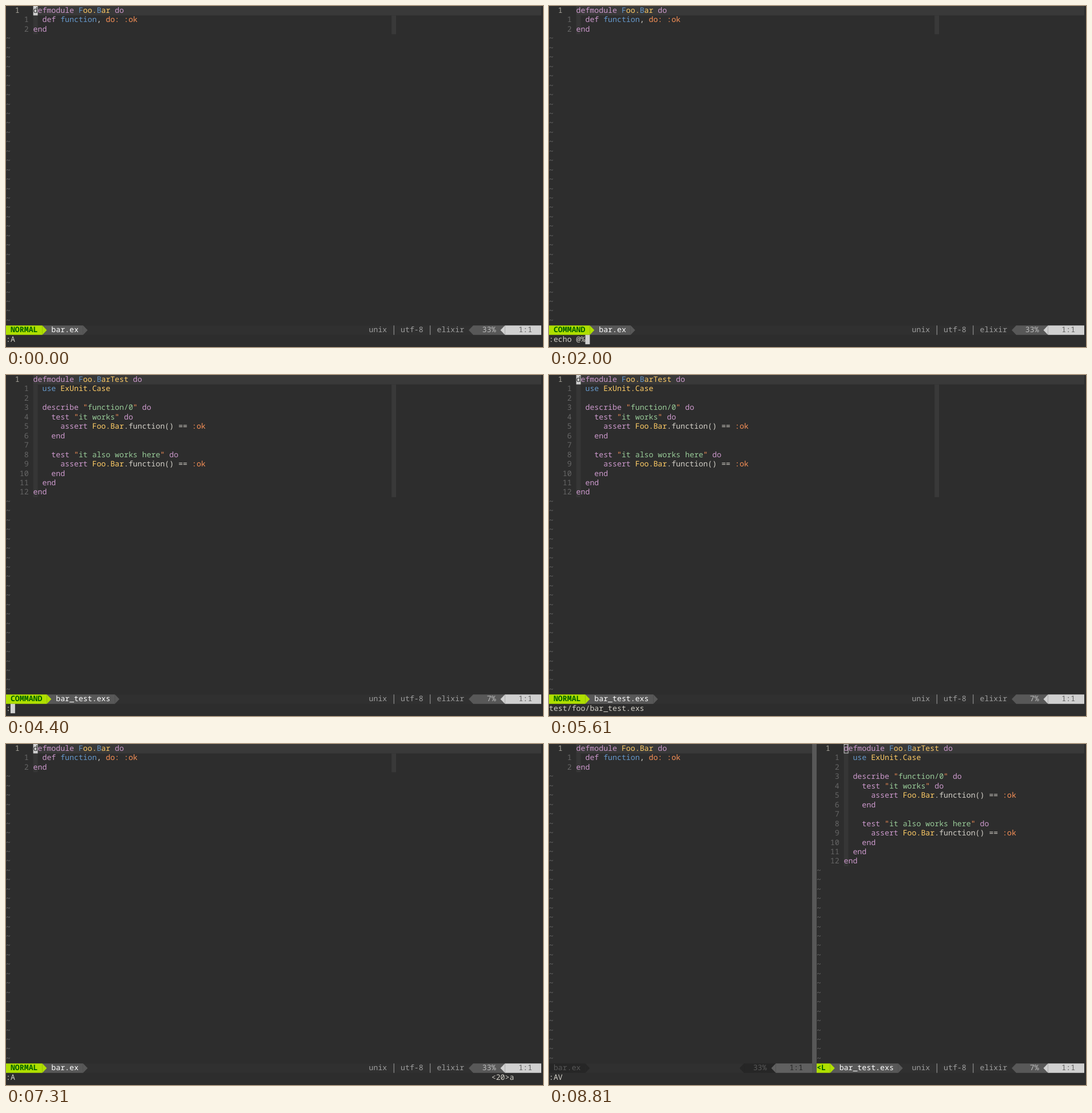
These frames come from a looping animation (939x597 px, 8840 ms). An HTML page:

```html
<!DOCTYPE html>
<html lang="en">
<head>
<meta charset="utf-8">
<title>Switching between module and test</title>
<style>
  html, body { margin: 0; width: 100%; height: 100%; overflow: hidden; background: #2d2d2d; }
  svg { display: block; width: 939px; height: 597px; }
  text {
    font: 13.22px "Noto Sans Mono", "DejaVu Sans Mono", monospace;
    text-rendering: geometricPrecision;
    white-space: pre;
  }
  .bold { font-weight: 700; }
</style>
</head>
<body>
<svg id="screen" viewBox="0 0 939 597"></svg>
<script>
const CW = 7.932, RH = 16.45, BASE = 12;
const COLS = 118, STATUS = 34, CMD = 35, GUTTER = 6, RULER = 85;
const LOOP = 8840;

const INK = { p: '#cc99cc', b: '#6699cc', y: '#ffcc66', o: '#f99157', g: '#99cc99', w: '#d3d0c8' };
const BG = '#2d2d2d', LINE = '#393939', CURSOR = '#d0d0d0', DIM = '#666666', GRAY = '#585858';

const MODULE = [
  '{p}defmodule {b}F{y}oo.{b}B{y}ar {p}do',
  '  {p}def {b}function{w}, {o}do: :ok',
  '{p}end'
];
const PLAIN_MODULE = ['{p}defmodule {y}Foo.Bar {p}do', ...MODULE.slice(1)];

const testCase = name => [
  `    {p}test {o}"{g}${name}{o}" {p}do`,
  '      {p}assert {y}Foo.Bar{w}.function() == {o}:ok',
  '    {p}end'
];
const TEST = [
  '{p}defmodule {b}F{y}oo.{b}B{y}arTest {p}do',
  '  {b}use {y}ExUnit.Case',
  '',
  '  {p}describe {o}"{g}function/0{o}" {p}do',
  ...testCase('it works'),
  '',
  ...testCase('it also works here'),
  '  {p}end',
  '{p}end'
];

const FILES = {
  module: { name: 'bar.ex', lines: MODULE, percent: '33%' },
  test: { name: 'bar_test.exs', lines: TEST, percent: ' 7%' }
};

// [start, view, command line, command mode, pending keys]
const STEPS = [
  [0, 'module', ':A'],
  [600, 'module', ':', true],
  [1030, 'module', ':e', true],
  [1130, 'module', ':ec', true],
  [1240, 'module', ':ech', true],
  [1330, 'module', ':echo', true],
  [1470, 'module', ':echo ', true],
  [1640, 'module', ':echo @', true],
  [1740, 'module', ':echo @%', true],
  [2270, 'module', 'lib/foo/bar.ex'],
  [3170, 'module', 'lib/foo/bar.ex', false, '<20>'],
  [3270, 'module', 'lib/foo/bar.ex', false, '<20>a'],
  [3400, 'test', ':A'],
  [4140, 'test', ':', true],
  [4510, 'test', ':echo @%', true],
  [5010, 'test', 'test/foo/bar_test.exs'],
  [5810, 'test', 'test/foo/bar_test.exs', false, '<20>'],
  [5870, 'test', 'test/foo/bar_test.exs', false, '<20>a'],
  [6110, 'module', ':A'],
  [7010, 'module', ':A', false, '<20>'],
  [7040, 'module', ':A', false, '<20>a'],
  [7340, 'split', ':AV'],
  [8810, 'split', ':AV', false, '', true]
];

const escapeText = s => s.replace(/&/g, '&amp;').replace(/</g, '&lt;');

const box = (col, row, w, h, fill) =>
  `<rect x="${col * CW}" y="${row * RH}" width="${w * CW}" height="${h * RH}" fill="${fill}"/>`;

// Each word starts exactly on its own cell.
function put(col, row, str, fill, cls = '') {
  let out = '';
  for (const m of str.matchAll(/\S+/g)) {
    out += `<text x="${(col + m.index) * CW}" y="${row * RH + BASE}" fill="${fill}" class="${cls}">${escapeText(m[0])}</text>`;
  }
  return out;
}

function arrow(col, fill, dir = 1) {
  const from = (dir > 0 ? col : col + 1) * CW, to = from + dir * CW, top = STATUS * RH;
  return `<path d="M${from} ${top}L${to} ${top + RH / 2}L${from} ${top + RH}Z" fill="${fill}"/>`;
}

function code(col, row, line) {
  let out = '', fill = INK.w;
  line.split(/\{(\w)\}/).forEach((part, i) => {
    if (i % 2) { fill = INK[part]; return; }
    out += put(col, row, part, fill);
    col += part.length;
  });
  return out;
}

function pane(left, right, lines) {
  const n = lines.length, text = left + GUTTER;
  let out = box(text, 0, right - text, 1, LINE) + box(text, 1, 1, n - 1, '#363636');
  if (left + RULER < right) out += box(left + RULER, 1, 1, n - 1, LINE);
  out += put(left + 2, 0, '1', '#a8a59b');
  lines.forEach((line, i) => {
    if (i) out += put(left + 3, i, String(i).padStart(2), DIM);
    out += code(text, i, line);
  });
  for (let row = n; row < STATUS; row++) out += put(left, row, '~', DIM);
  return out;
}

function position(right, percent, segBg, segInk, posBg, posInk) {
  return box(right - 15, STATUS, 7, 1, segBg) + arrow(right - 16, segBg, -1) +
    put(right - 13, STATUS, percent, segInk) +
    box(right - 8, STATUS, 8, 1, posBg) + arrow(right - 9, posBg, -1) +
    put(right - 5, STATUS, '1:1', posInk);
}

function statusLine(left, mode, file) {
  const a = left + mode.length, b = a + file.name.length + 3;
  return box(left, STATUS, COLS - left, 1, '#303030') +
    box(a, STATUS, b - a, 1, GRAY) + arrow(b, GRAY) +
    box(left, STATUS, mode.length, 1, '#afdf00') + arrow(a, '#afdf00') +
    put(left, STATUS, mode, '#005f00', 'bold') +
    put(a + 2, STATUS, file.name, '#ffffff') +
    put(80, STATUS, 'unix', '#9e9e9e') + put(87, STATUS, 'utf-8', '#9e9e9e') +
    put(95, STATUS, 'elixir', '#9e9e9e') +
    [85, 93].map(c => box(c + 0.45, STATUS, 0.13, 1, '#9e9e9e')).join('') +
    position(COLS, file.percent, GRAY, '#bcbcbc', '#d0d0d0', '#606060');
}

function idleStatus(right, file) {
  return box(0, STATUS, right, 1, '#303030') +
    box(0, STATUS, 8, 1, '#262626') + arrow(8, '#262626') +
    put(1, STATUS, file.name, GRAY) +
    position(right, file.percent, '#262626', GRAY, '#606060', '#262626');
}

function cursor(col, hollow) {
  if (hollow) {
    return `<rect x="${col * CW + 0.5}" y="0.5" width="${CW - 1}" height="${RH - 1}" fill="none" stroke="${CURSOR}"/>`;
  }
  return box(col, 0, 1, 1, CURSOR) + put(col, 0, 'd', BG);
}

function render([, view, cmd, typing, keys = '', hollow]) {
  let out = '', left = 0;
  if (view === 'split') {
    left = 59;
    out += pane(0, left - 1, PLAIN_MODULE) + idleStatus(left - 1, FILES.module) +
      pane(left, COLS, TEST) + statusLine(left, '<L ', FILES.test) +
      box(left - 1, 0, 1, STATUS + 1, GRAY);
  } else {
    const file = FILES[view];
    out += pane(0, COLS, file.lines) + statusLine(0, typing ? ' COMMAND ' : ' NORMAL ', file);
  }
  out += put(0, CMD, cmd, INK.w) + put(107, CMD, keys, INK.w);
  out += typing ? box(cmd.length, CMD, 1, 1, CURSOR) : cursor(left + GUTTER, hollow);
  return out;
}

const screen = document.getElementById('screen');
let shown;

function tick() {
  const t = performance.now() % LOOP;
  const step = STEPS.findLast(s => s[0] <= t);
  if (step !== shown) {
    shown = step;
    screen.innerHTML = render(step);
  }
  requestAnimationFrame(tick);
}
tick();
</script>
</body>
</html>
```
